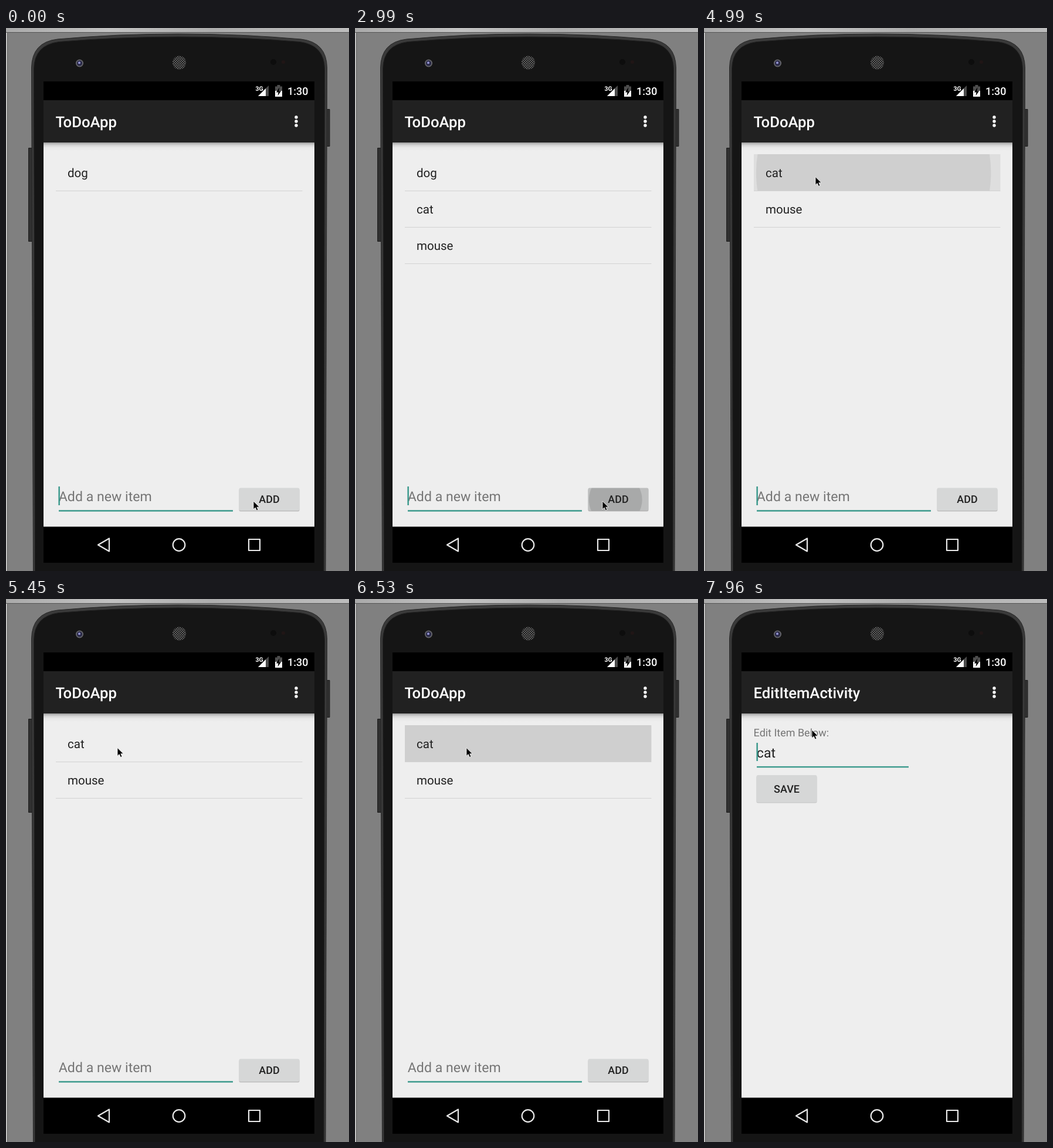
An HTML page for the animation above (8000 ms loop, 585 px wide and 925 px high).

```html
<!DOCTYPE html>
<html lang="en">
<head>
<meta charset="utf-8">
<title>ToDoApp</title>
<style>
  html, body { margin: 0; width: 100%; height: 100%; overflow: hidden; background: #808080; }
  svg { display: block; width: 100vw; height: 100vh; }
  text { font-family: Roboto, sans-serif; fill: #212121; white-space: pre; text-rendering: geometricPrecision; }
  .medium { font-weight: 500; }
  .title { font-size: 25.67px; fill: #fff; }
  .row { font-size: 20.53px; }
  .field { font-size: 23.1px; }
  .small { font-size: 17.97px; }
  .hint { fill: #757575; }
  .accent { fill: #3c9a8d; }
  .button { fill: #d6d7d7; }
</style>
</head>
<body>
<svg viewBox="0 0 585 925">
  <defs>
    <linearGradient id="strip">
      <stop offset="0" stop-color="#aaa"/><stop offset=".3" stop-color="#c2c2c2"/>
      <stop offset=".6" stop-color="#adadad"/><stop offset="1" stop-color="#bdbdbd"/>
    </linearGradient>
    <linearGradient id="shade" x2="0" y2="1">
      <stop offset="0" stop-opacity=".34"/><stop offset=".3" stop-opacity=".12"/>
      <stop offset=".6" stop-opacity=".03"/><stop offset="1" stop-opacity="0"/>
    </linearGradient>
    <pattern id="mesh" width="4" height="4" patternUnits="userSpaceOnUse">
      <rect width="4" height="4" fill="#1c1c1c"/>
      <circle cx="1" cy="1" r="1.1" fill="#666"/><circle cx="3" cy="3" r="1.1" fill="#666"/>
    </pattern>
    <clipPath id="rippleClip"><rect id="clipBox"/></clipPath>
  </defs>

  <!-- desktop -->
  <rect width="585" height="925" fill="#808080"/>
  <rect width="585" height="7" fill="url(#strip)"/>
  <rect y="7" width="585" height="1" fill="#555"/>
  <rect y="8" width="2" height="917" fill="#c4c4c4"/>
  <rect x="2" y="7" width="1" height="918" fill="#5c5c5c"/>

  <!-- phone body -->
  <path d="M38.500 204.500h6v159h-6zM546 138.500h6v63h-6z" fill="#303030" stroke="#1c1c1c"/>
  <path d="M46.500 930L43.500 68Q44 24 88 19Q190 10 295.500 10T503 19Q547 24 547.500 68L545 930Z" fill="#3a3a3a" stroke="#262626"/>
  <path d="M49.500 930L47.500 70Q48 29 90 23.500Q190 15 295.500 15T501 23.500Q543 29 543.500 70L542 930Z" fill="#151515" stroke="#222"/>
  <circle cx="125.500" cy="60" r="6.500" fill="#66666a"/>
  <circle cx="125.500" cy="60" r="4.700" fill="#2a2a48"/>
  <circle cx="125" cy="59.300" r="2" fill="#9494d4"/>
  <circle cx="295.500" cy="59" r="11.500" fill="url(#mesh)"/>
  <circle cx="456" cy="58" r="5" fill="#0d0d0d"/>
  <circle cx="473" cy="58" r="3" fill="#201616"/>

  <!-- status bar -->
  <rect x="64" y="91" width="462" height="820"/>
  <path d="M430 116L448 98V116Z" fill="#4d4d4d"/>
  <path d="M430 116L443 103V116Z" fill="#fff"/>
  <text x="425.500" y="107" font-size="10.500" font-weight="700" style="fill:#fff">3G</text>
  <path d="M459 99.500h3.500V97h5v2.500h3.500V117h-12z" fill="#4d4d4d"/>
  <path d="M459 107h12v10h-12z" fill="#fff"/>
  <path d="M466.500 101L460.800 109.500h3.700L463.500 115.500l5.700-8.300h-3.700z"/>
  <text class="small medium" x="480" y="114" style="fill:#fff">1:30</text>

  <!-- app window -->
  <g id="window">
    <rect x="64" y="195" width="462" height="654.500" fill="#eee"/>
    <rect x="64" y="195" width="462" height="14" fill="url(#shade)"/>
    <rect x="64" y="123" width="462" height="72" fill="#212121"/>
    <text id="title" class="title medium" x="84.600" y="169"></text>
    <g fill="#fff">
      <circle cx="495" cy="152" r="2.700"/><circle cx="495" cy="159" r="2.700"/><circle cx="495" cy="166" r="2.700"/>
    </g>

    <g id="listScreen">
      <rect x="397.500" y="785" width="103" height="38.500" rx="2.500" fill="#bdbdbd"/>
      <rect class="button" x="397.500" y="783.500" width="103" height="38.500" rx="2.500"/>
      <g id="ripple" clip-path="url(#rippleClip)">
        <rect id="rippleBase" width="585" height="925"/>
        <circle id="rippleDisc"/>
      </g>
      <g id="rows"></g>
      <text class="small medium" x="449" y="809" text-anchor="middle">ADD</text>
      <text id="draft" class="field" x="89.800" y="806"></text>
      <rect class="accent" x="90" y="821.200" width="297" height="2.500"/>
    </g>

    <g id="editScreen">
      <text class="small hint" x="84.600" y="234.300">Edit Item Below:</text>
      <text class="field" x="89.800" y="270">cat</text>
      <rect class="accent" x="90" y="284.900" width="259" height="2.400"/>
      <rect x="89.500" y="301.500" width="103" height="46" rx="2.500" fill="#c4c4c4"/>
      <rect class="button" x="89.500" y="300" width="103" height="46.500" rx="2.500"/>
      <text class="small medium" x="141" y="330" text-anchor="middle">SAVE</text>
    </g>
    <rect id="caret" class="accent" width="2.500"/>
  </g>

  <!-- navigation bar -->
  <g fill="none" stroke="#e8e8e8" stroke-width="2.200" stroke-linejoin="round">
    <path d="M157 880.500L176 869.500V891.500Z"/>
    <circle cx="295" cy="880.500" r="10.300"/>
    <rect x="414" y="871" width="19" height="19"/>
  </g>

  <path id="pointer" d="M0 0V14L3.200 11L5.500 16L8 15L5.800 10.200H10.300Z" stroke="#fff" stroke-width=".8"/>
</svg>

<script>
const LOOP = 8000;
const EDIT_OPENS = 6840;
const EDIT_SETTLES = 6990;
const $ = id => document.getElementById(id);
const attrs = (el, values) => {
  for (const name in values) el.setAttribute(name, values[name]);
};

const refreshes = [
  0, 120, 270, 550, 1010, 1160, 1310, 1620, 1930, 2080, 2230, 2380,
  2840, 2990, 3140, 3290, 3440, 3590, 3710, 3860, 3980,
  4410, 4560, 4710, 4850, 4990, 5140, 5450, 5910,
  6220, 6380, 6530, 6680, 6840, 6990, 7300, 7600, 7720, 7840, 7960
];
const drafts = [[0, ''], [120, 'c'], [270, 'ca'], [550, 'cat'], [1160, ''],
  [1930, 'm'], [2080, 'mo'], [2230, 'mous'], [2380, 'mouse'], [2990, '']];
const lists = [[0, ['dog']], [1160, ['dog', 'cat']],
  [2990, ['dog', 'cat', 'mouse']], [4990, ['cat', 'mouse']]];
const caretBlinks = [[0, 1], [1620, 0], [1930, 1], [3440, 0], [3980, 1], [4410, 0],
  [4990, 1], [5450, 0], [5910, 1], [6380, 0], [6840, 1], [7300, 0], [7840, 1]];
const pointerPath = [[0, 422, 806], [3140, 422, 806], [3980, 190, 253.5], [6530, 190, 253.5],
  [6840, 231.5, 483.5], [6990, 231.5, 483.5], [7300, 226, 453], [7480, 226, 453], [7960, 184, 223]];

const addButton = { x: 397.5, y: 783.5, width: 103, height: 39, rx: 2.5 };
const firstRow = { x: 85, y: 215, width: 420.5, height: 62, rx: 0 };
const presses = [
  { start: 1010, release: 1310, end: 1310, box: addButton, from: .3, rate: .0035 },
  { start: 2840, release: 3140, end: 3140, box: addButton, from: .3, rate: .0035 },
  { start: 4410, release: 4910, end: 5140, box: firstRow, from: .2, rate: .00128 },
  { start: 6220, release: 6500, end: 6680, box: firstRow, from: .38, rate: .0026 }
];

const latest = (steps, t) => steps.findLast(([start]) => start <= t)[1];
const easeInOut = u => u < .5 ? 4 * u ** 3 : 1 - 4 * (1 - u) ** 3;

function pointerAt(t) {
  const next = pointerPath.findIndex(([time]) => time > t);
  if (next < 0) return pointerPath.at(-1).slice(1);
  const [t0, x0, y0] = pointerPath[next - 1], [t1, x1, y1] = pointerPath[next];
  const u = easeInOut((t - t0) / (t1 - t0));
  return [x0 + (x1 - x0) * u, y0 + (y1 - y0) * u];
}

// The disc grows from the touch point while drifting to the middle of its box.
function drawRipple(t, [touchX, touchY]) {
  const press = presses.find(p => t >= p.start && t < p.end);
  $('ripple').style.display = press ? '' : 'none';
  if (!press) return;
  const { x, y, width, height } = press.box;
  const grow = Math.min(1, press.from + (t - press.start) * press.rate);
  const opacity = t < press.release ? .115 : .065;
  attrs($('clipBox'), press.box);
  attrs($('rippleBase'), { opacity });
  attrs($('rippleDisc'), {
    cx: touchX + (x + width / 2 - touchX) * grow,
    cy: touchY + (y + height / 2 - touchY) * grow,
    r: Math.hypot(width, height) / 2 * grow,
    opacity
  });
}

// Returns the width of the typed text, where the caret belongs.
function drawList(t) {
  $('rows').innerHTML = latest(lists, t).map((item, i) => `
    <text class="row" x="105" y="${254 + 62 * i}">${item}</text>
    <rect x="85" y="${277 + 62 * i}" width="420.5" height="1" fill="#d2d2d2"/>`).join('');
  const draft = latest(drafts, t);
  $('draft').textContent = draft || 'Add a new item';
  $('draft').classList.toggle('hint', !draft);
  return draft ? $('draft').getComputedTextLength() : 0;
}

function draw(t) {
  const editing = t >= EDIT_OPENS;
  const slide = editing && t < EDIT_SETTLES ? 2.5 : 0;
  const pointer = pointerAt(t);
  $('listScreen').style.display = editing ? 'none' : '';
  $('editScreen').style.display = editing ? '' : 'none';
  $('title').textContent = editing ? 'EditItemActivity' : 'ToDoApp';
  attrs($('window'), { transform: `translate(0 ${slide})` });

  const typedWidth = editing ? 0 : drawList(t);
  drawRipple(t, pointer);
  attrs($('caret'), {
    x: 89.4 + typedWidth, y: editing ? 245 : 781, height: editing ? 31 : 32,
    opacity: latest(caretBlinks, t)
  });
  attrs($('pointer'), {
    transform: `translate(${pointer})`,
    opacity: t < 120 || t >= 1010 ? 1 : 0
  });
}

let shown = -1;
const start = performance.now();
function tick() {
  const t = (performance.now() - start) % LOOP;
  const moment = refreshes.findLast(time => time <= t);
  if (moment !== shown) draw(shown = moment);
  requestAnimationFrame(tick);
}
tick();
</script>
</body>
</html>
```
